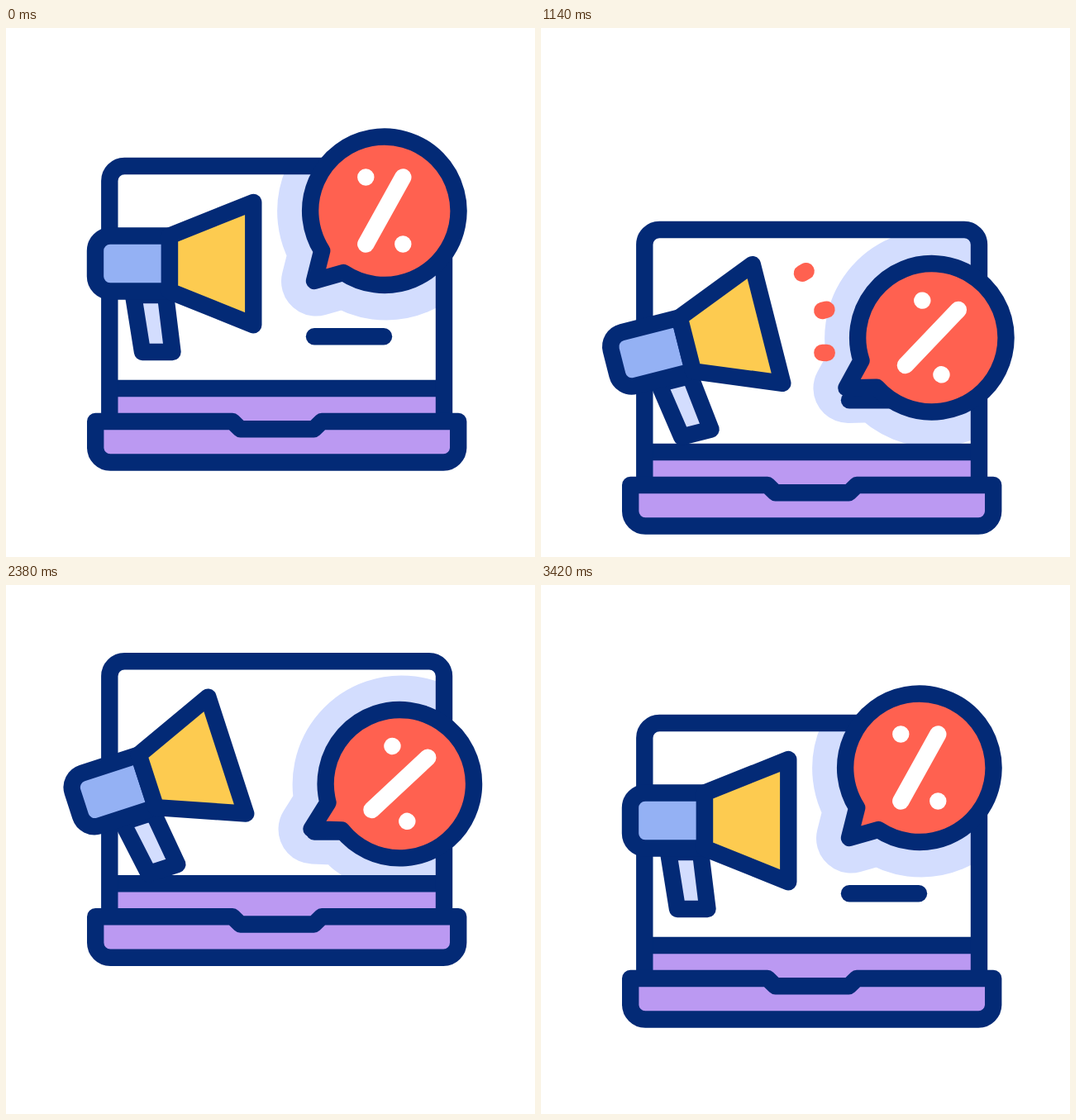
An HTML page that plays this animation: 640 by 640 pixels, repeating every 3620 ms.

```html
<!DOCTYPE html>
<html lang="en">
<head>
<meta charset="utf-8">
<title>Laptop promotion</title>
<style>
  html, body { margin: 0; height: 100%; overflow: hidden; background: #fff; }
  svg { display: block; width: 100%; height: 100%; }
  .ink { stroke: #032a76; stroke-width: 20.4; stroke-linecap: round; stroke-linejoin: round; }
</style>
</head>
<body>
<svg viewBox="0 0 640 640">
  <defs>
    <clipPath id="screen"><path d="M125 167H530V436H125Z"/></clipPath>
    <path id="balloon" d="M-84.8 85L-75.6 48.5A89.7 89.7 0 1 1 -49.6 75Z"/>
  </defs>
  <g id="scene" fill="none">
    <g clip-path="url(#screen)">
      <g transform="translate(2 .5)">
        <use class="bubble" href="#balloon" fill="#d3ddfe" stroke="#d3ddfe" stroke-width="84" stroke-linejoin="round"/>
      </g>
    </g>

    <path d="M125.3 436H530V486H125.3Z" fill="#bb99f2"/>
    <g class="ink">
      <path d="M130 436H525"/>
      <path d="M125.3 476V185A18 18 0 0 1 143.3 167H512A18 18 0 0 1 530 185V476"/>
      <path fill="#bb99f2" d="M108.2 476H274L283.5 485.3H372.5L382 476H547.2V507.5A18 18 0 0 1 529.2 525.5H126.2A18 18 0 0 1 108.2 507.5Z"/>
      <path d="M373 373.3H457"/>
    </g>

    <g id="horn">
      <g class="ink">
        <path fill="#d3ddfe" d="M154 323L165 392H201.5L193 323Z"/>
        <path fill="#94b1f4" d="M198 251.5H126A18 18 0 0 0 108 269.5V300.5A18 18 0 0 0 126 318.5H198Z"/>
        <path fill="#fdcb50" d="M198 251.5L299.3 211V359.3L198 318.5Z"/>
      </g>
      <g id="sparks" stroke="#ff6150" stroke-width="20.4" stroke-linecap="round"></g>
    </g>

    <g class="bubble">
      <use class="ink" href="#balloon" fill="#ff6150"/>
      <path d="M22.5 -40.5L-22.5 40.5M-22.5 -40.5h0M22.5 40.5h0" stroke="#fff" stroke-width="20.4" stroke-linecap="round"/>
    </g>
  </g>
</svg>
<script>
const LOOP = 3620, END = 3400;
const FLOAT = END / 3;   // one leg of the vertical drift
const SWING = END / 4;   // half a swing of horn and bubble
const HEIGHTS = [0, 77, -77, 0, 0];

const $ = id => document.getElementById(id);
const bubbles = document.querySelectorAll('.bubble');

// One dash per direction: x, y, angle
const sparks = [[357.5, 235.5, -15], [370, 286, 0], [357.5, 336, 15]].map(([x, y, angle]) => {
  const path = document.createElementNS('http://www.w3.org/2000/svg', 'path');
  path.setAttribute('d', 'M-2.7 0H2.7');
  $('sparks').append(path);
  return { path, x, y, angle };
});

const move = (el, transform) => el.setAttribute('transform', transform);

// Cubic easing with evenly spaced time handles
const ease = (p, a = 0, b = 1) =>
  3 * (1 - p) ** 2 * p * a + 3 * (1 - p) * p * p * b + p ** 3;

function draw(now) {
  const t = Math.min(now % LOOP, END);
  const leg = Math.floor(t / FLOAT);
  const y = HEIGHTS[leg] + (HEIGHTS[leg + 1] - HEIGHTS[leg]) * ease(t / FLOAT - leg);

  const age = t % (2 * SWING) - SWING;   // time since the swing's peak
  const swing = 1 - Math.abs(age) / SWING;
  const tilt = age < 0 ? ease(swing, .05, .8) : ease(swing, .12, .77);
  const drop = ease(swing);

  move($('scene'), `translate(0 ${y})`);
  move($('horn'), `rotate(${-21.8 * tilt} 270 384)`);
  for (const b of bubbles)
    move(b, `translate(${457.8 + 20.7 * drop} ${221 + 105 * drop}) rotate(${20 * drop})`);

  $('sparks').setAttribute('opacity', Math.max(0, Math.min(1, age / 210, (600 - age) / 150)));
  for (const s of sparks)
    move(s.path, `translate(${s.x} ${s.y}) rotate(${s.angle}) translate(${(age - 290) * .08} 0)`);

  requestAnimationFrame(draw);
}
draw(0);
</script>
</body>
</html>
```
